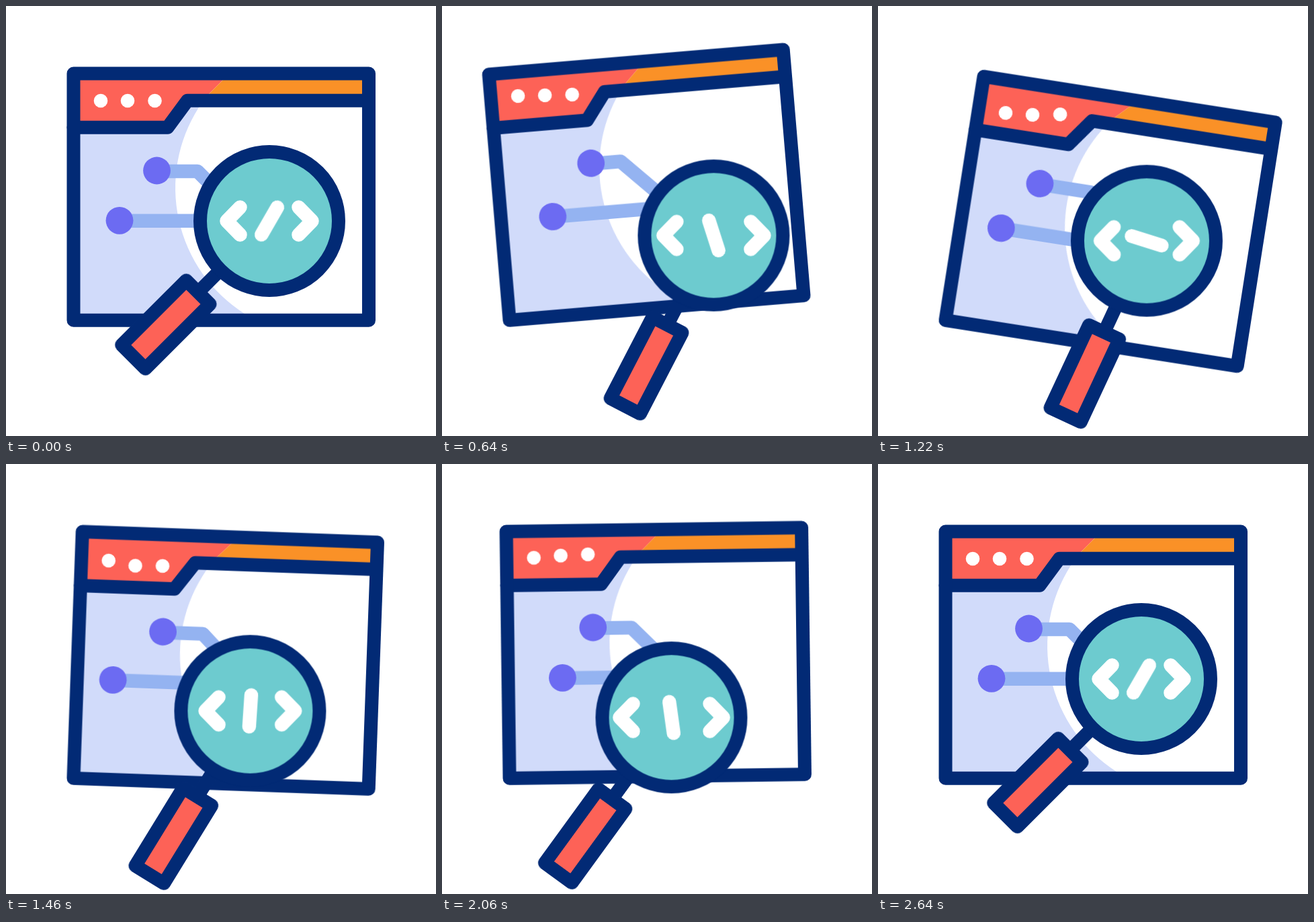
Recreate the animation shown at these times as an HTML page without scripts. Size 640 px wide and 640 px high, loop 3 s.

```html
<!DOCTYPE html>
<html lang="en">
<head>
<meta charset="utf-8">
<title>Code search</title>
<style>
  @property --shift { syntax: "<length>"; inherits: true; initial-value: 0px; }

  html, body { margin: 0; width: 100%; height: 100%; overflow: hidden; background: #fff; }
  svg { display: block; width: 100vw; height: 100vh; }

  .outline { fill: none; stroke: #022a75; stroke-width: 20; stroke-linecap: round; stroke-linejoin: round; }
  .code { fill: none; stroke: #fff; stroke-width: 20.5; stroke-linecap: round; stroke-linejoin: round; }

  .window, .dot, .node, .glass, .handle, .chevron, .slash {
    animation: 3s cubic-bezier(.333, 0, .667, 1) .2s infinite both;
  }
  .late { animation-delay: .39s; }
  .later { animation-delay: .58s; }

  .window { transform-origin: 100.5px 467.5px; animation-name: tilt; }
  .dot { fill: #fff; animation-name: bob; }
  .node { animation-name: slide; }
  .node circle { fill: #6c6bf2; transform: translateX(var(--shift)); }
  .node path {
    fill: none; stroke: #94b3f1; stroke-width: 20.5; stroke-linejoin: round;
    stroke-dashoffset: var(--shift);
  }
  .glass { animation-name: roam; }
  .handle { animation-name: turn; }
  .chevron { animation-name: spread; }
  .slash { animation-name: flip; }

  @keyframes tilt {
    0%, 66.667%, 100% { transform: rotate(0deg); }
    16.667% { transform: rotate(-5deg); }
    33.333% { transform: rotate(9deg); }
    50% { transform: rotate(-4deg); }
  }
  @keyframes bob {
    0%, 66.667%, 100% { transform: translateY(0); }
    16.667%, 50% { transform: translateY(-5px); }
    33.333% { transform: translateY(8px); }
  }
  @keyframes slide {
    0%, 66.667%, 100% { --shift: 0px; }
    16.667%, 50% { --shift: 17px; }
    33.333% { --shift: -17px; }
  }
  @keyframes roam {
    0%, 80%, 100% { transform: translate(392px, 320px); }
    20%, 30% { transform: translate(407px, 346px); }
    50%, 60% { transform: translate(340px, 379px); }
  }
  @keyframes turn {
    0%, 80%, 100% { transform: rotate(45deg); }
    20%, 30% { transform: rotate(23.7deg); }
    50%, 60% { transform: rotate(35.8deg); }
  }
  @keyframes spread {
    0%, 80%, 100% { transform: translateX(0); }
    20%, 60% { transform: translateX(-14px); }
    40% { transform: translateX(-3px); }
  }
  @keyframes flip {
    0% { transform: rotate(30deg); }
    22.2% { transform: rotate(210deg); }
    48.3% { transform: rotate(390deg); }
    67.8%, 100% { transform: rotate(570deg); }
  }
</style>
</head>
<body>
<svg viewBox="0 0 640 640">
  <g class="window">
    <path fill="#d1dbfa" d="M105 145H290L287 151A222 222 0 0 0 355 458V463H105Z"/>
    <path fill="#fd6257" d="M105 105H328L296 137H270L240 180H105Z"/>
    <path fill="#fa9127" d="M328 105H535V137H296Z"/>
    <circle class="dot" cx="141" cy="141" r="10.3"/>
    <circle class="dot late" cx="181" cy="141" r="10.3"/>
    <circle class="dot later" cx="221.5" cy="141" r="10.3"/>
    <path class="outline" d="M100.5 180.7H240.5L270 140.7H540"/>
    <rect class="outline" x="100.5" y="100.5" width="439.5" height="367.3"/>
    <g class="node">
      <path stroke-dasharray="152.4 300" d="M350 311L285 246H190"/>
      <circle cx="224.5" cy="245" r="20.4"/>
    </g>
    <g class="node late">
      <path stroke-dasharray="191 300" d="M360 319.7H130"/>
      <circle cx="169" cy="319.3" r="20.4"/>
    </g>
  </g>

  <g class="glass">
    <g class="handle">
      <path class="outline" d="M0 103V150"/>
      <rect class="outline" x="-25" y="150" width="50" height="136" style="fill:#fd6257"/>
    </g>
    <circle class="outline" r="103" style="fill:#6dcbcf"/>
    <path class="code chevron" d="M-43.5 -20.5L-63.5 0L-43.5 20.5"/>
    <g transform="scale(-1 1)">
      <path class="code chevron" d="M-43.5 -20.5L-63.5 0L-43.5 20.5"/>
    </g>
    <path class="code slash" d="M0 -23.6V23.6"/>
  </g>
</svg>
</body>
</html>
```
